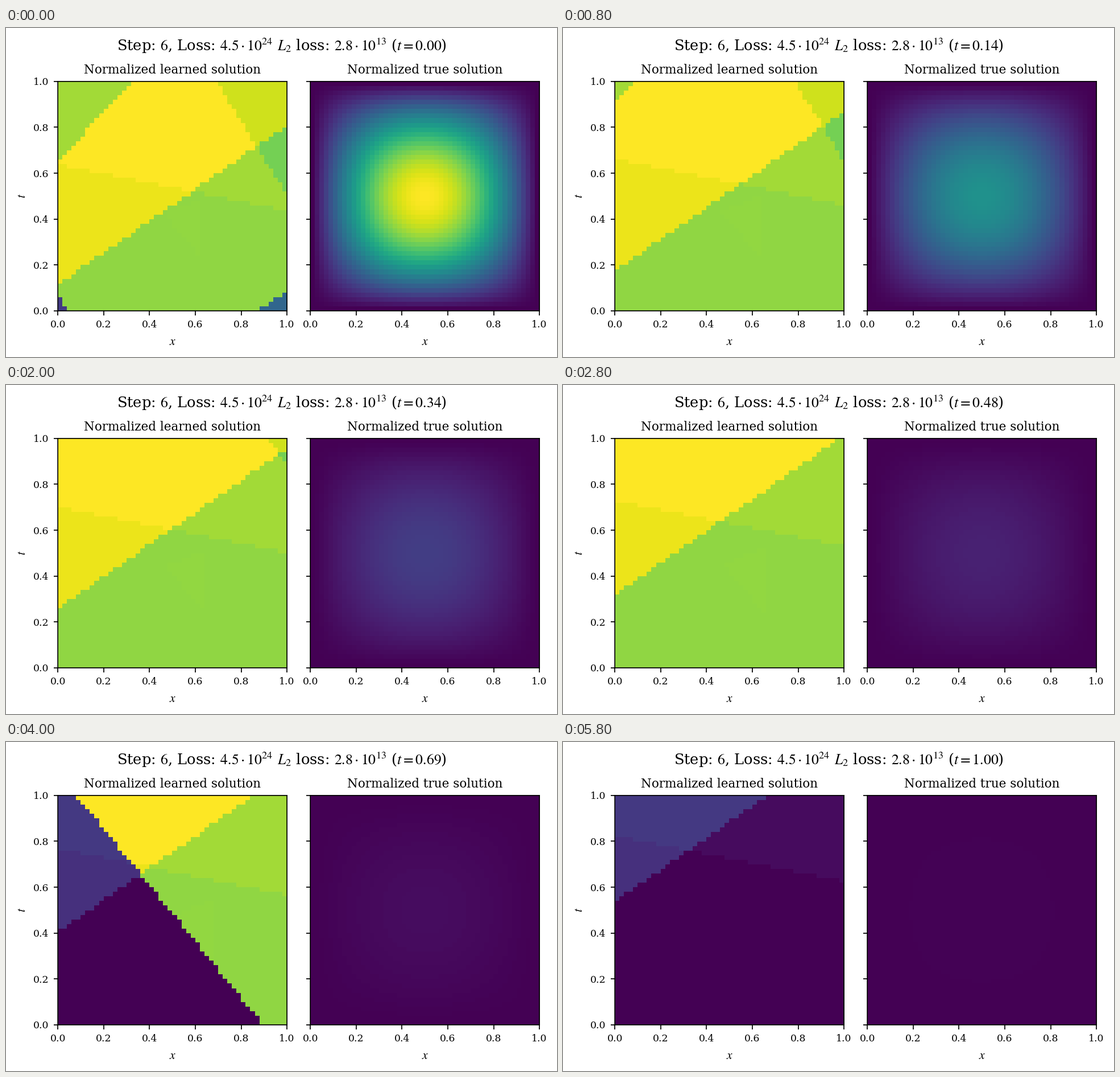
A matplotlib script for the animation above (6000 ms loop, 969 px wide and 578 px high).

```python
import numpy as np
import matplotlib.pyplot as plt
from matplotlib.animation import FuncAnimation

W, H, DPI = 969, 578, 128
FRAMES, STEP_MS = 30, 200
CELLS = 50


def pt(px):
    return px * 72 / DPI


plt.rcParams.update({
    "font.family": "DejaVu Serif",
    "mathtext.fontset": "stix",
    "axes.linewidth": pt(1.72),
    "xtick.major.width": pt(1.72), "ytick.major.width": pt(1.72),
    "xtick.major.size": pt(7.5), "ytick.major.size": pt(7.5),
    "xtick.major.pad": pt(8.4), "ytick.major.pad": pt(8.4),
    "xtick.labelsize": pt(17.2), "ytick.labelsize": pt(17.2),
})

centres = (np.arange(CELLS) + 0.5) / CELLS
X, Y = np.meshgrid(centres, centres)
wave = np.sin(np.pi * np.linspace(0, 1, CELLS))
bump = np.outer(wave, wave) / wave.max() ** 2


def above(y0, slope, speed, t):
    """Cells above the moving line y = y0 + slope * x + speed * t."""
    return Y > y0 + slope * X + speed * t


def learned(t):
    """Piecewise constant field, in steps of the 256-entry colour map."""
    diagonal = above(0.1136, 0.695, 0.4235, t)
    shallow = above(0.6375, -0.2012, 0.19, t)
    swept = ~above(-2.619, -1.224, 5.391, t)
    level = np.full(X.shape, 213)
    level += 35 * diagonal + 7 * shallow
    level -= 35 * above(0.6505, 1.08, 1.805, t)
    level -= 18 * above(2.1238, -1.62, 1.08, t)
    level -= 129 * ~above(-0.5348, 0.62, -0.77, t)
    level -= 170 * ~above(0.079, -1.9, -1.2, t)
    level += ((X < 0.62 + 0.08 * t) & above(0.98, -1.2, 0.08, t)
              & ~above(0.24, 0.4, 0.05, t) & ~diagonal & ~shallow & ~swept)
    level -= 213 * swept
    return (np.clip(level, 0, 255) + 0.5) / 256


def true(t):
    return bump * np.exp(-np.pi ** 2 / 2 * t)


def heading(t):
    return (r"Step: $6$, Loss: $4.5\cdot10^{24}$ $L_2$ loss: "
            rf"$2.8\cdot10^{{13}}$ ($t={t:.2f}$)")


fig = plt.figure(figsize=(W / DPI, H / DPI), dpi=DPI, facecolor="white")


def label(x, y, text, size, **kw):
    return fig.text(x / W, 1 - y / H, text, fontsize=pt(size), ha="center", **kw)


def panel(left, title, data):
    ax = fig.add_axes([left / W, 1 - 496.9 / H, 403 / W, 403 / H])
    image = ax.imshow(data, origin="lower", extent=(0, 1, 0, 1), cmap="viridis",
                      vmin=0, vmax=1, interpolation="nearest", aspect="auto")
    ticks = np.linspace(0, 1, 6)
    ax.set_xticks(ticks)
    ax.set_yticks(ticks)
    for spine in ax.spines.values():
        spine.set_snap(False)
    label(left + 201.5, 80, title, 21.5, va="baseline")
    label(left + 201.5, 551, "$x$", 21.5, va="center")
    return ax, image


_, left_image = panel(91.15, "Normalized learned solution", learned(0))
right_ax, right_image = panel(535.15, "Normalized true solution", true(0))
right_ax.tick_params(labelleft=False)
label(28, 294.5, "$t$", 21.5, va="center", rotation=90)
head = label(484.5, 40.3, heading(0), 25.8, va="baseline")


def update(i):
    t = i / (FRAMES - 1)
    left_image.set_data(learned(t))
    right_image.set_data(true(t))
    head.set_text(heading(t))
    return left_image, right_image, head


anim = FuncAnimation(fig, update, frames=FRAMES, interval=STEP_MS,
                     repeat=True, repeat_delay=0, blit=False)
plt.show()
```
